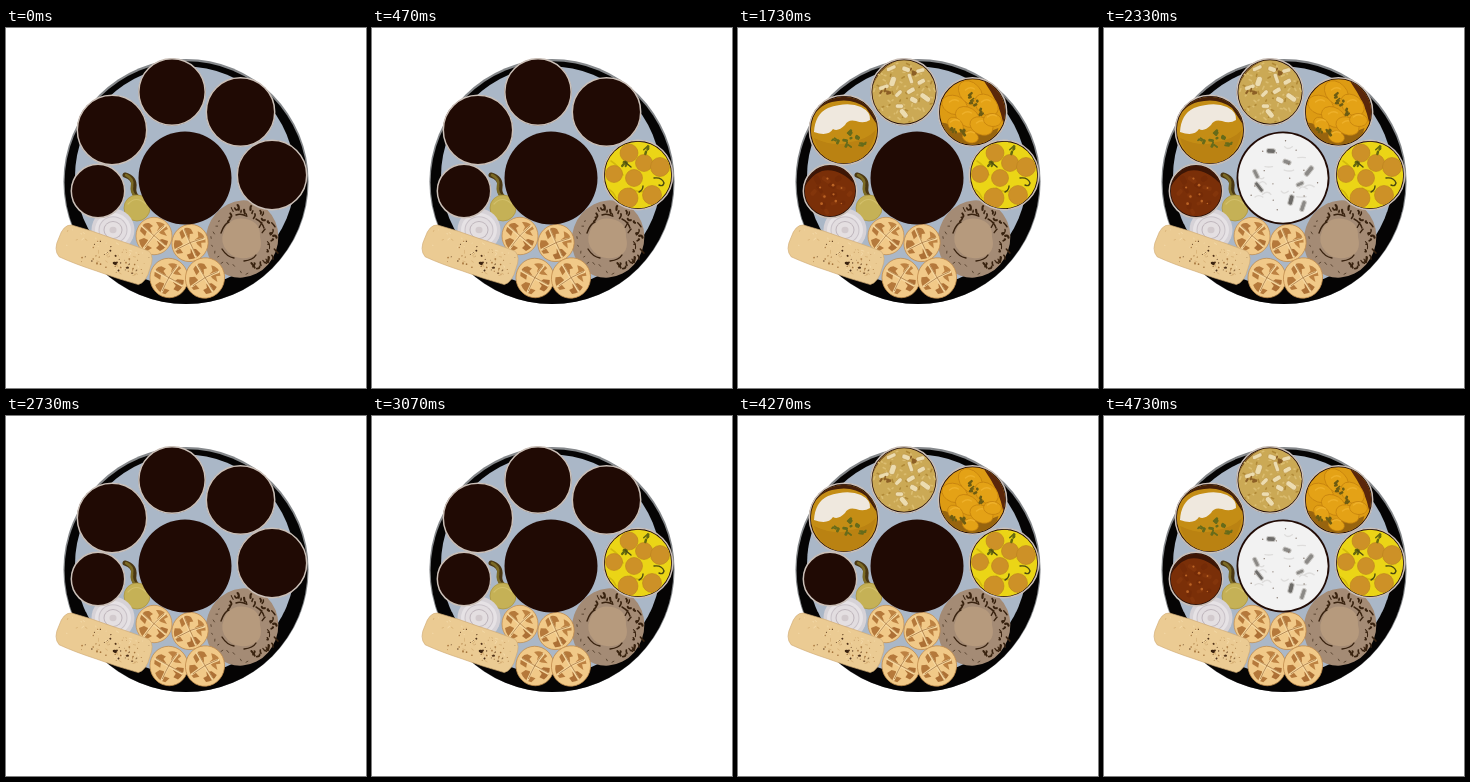
An HTML page that plays this animation: 360x360 px, repeating every 5.34 s.

```html
<!DOCTYPE html>
<html lang="en">
<head>
<meta charset="utf-8">
<title>Thali</title>
<style>
html, body { margin: 0; width: 100%; height: 100%; overflow: hidden; background: #fff; }
svg { display: block; width: 100vw; height: 100vh; }
</style>
</head>
<body>
<svg id="stage" viewBox="0 0 360 360"></svg>
<script>
const NS = 'http://www.w3.org/2000/svg';
const stage = document.getElementById('stage');
const LOOP = 5340, RESET = 2730;
const DARK = '#200a04';

let seed = 7;
const rnd = (a = 0, b = 1) => {
  seed = (seed * 16807) % 2147483647;
  return a + (b - a) * seed / 2147483647;
};

function add(parent, tag, attrs) {
  const el = document.createElementNS(NS, tag);
  for (const k in attrs) el.setAttribute(k, attrs[k]);
  parent.appendChild(el);
  return el;
}
const circle = (g, cx, cy, r, fill, more) => add(g, 'circle', { cx, cy, r, fill, ...more });
const path = (g, d, fill, more) => add(g, 'path', { d, fill, ...more });
const line = (g, d, stroke, width) =>
  path(g, d, 'none', { stroke, 'stroke-width': width, 'stroke-linecap': 'round', 'stroke-linejoin': 'round' });
const group = (g, x, y, turn = 0) => add(g, 'g', { transform: `translate(${x} ${y}) rotate(${turn})` });

// Calls fn at n scattered points, evenly spread over a disc
function scatter(n, radius, fn) {
  for (let i = 0; i < n; i++) {
    const d = radius * Math.sqrt((i + 0.5) / n), a = i * 2.4 + rnd(0, 0.5);
    fn(d * Math.cos(a), d * Math.sin(a), i);
  }
}
function chunk(g, x, y, w, h, fill, more) {
  add(g, 'rect', { x: x - w / 2, y: y - h / 2, width: w, height: h, rx: h / 2.3, fill,
    transform: `rotate(${rnd(-80, 80)} ${x} ${y})`, ...more });
}
function leaves(g, spots, color = '#5d6418') {
  for (const [x, y] of spots)
    for (let i = 0; i < 4; i++)
      chunk(g, x + rnd(-4, 4), y + rnd(-3, 3), rnd(3, 6), rnd(1.5, 3), color);
}

// Plate with a thin metal edge along the top
circle(stage, 180, 153.5, 122.6, '#85888b');
circle(stage, 180, 154.6, 121.4, '#050404');
circle(stage, 179, 148.5, 110, '#aab7c7');

// Flatbread on the right
function flatbread() {
  const g = group(stage, 236, 211);
  add(g, 'ellipse', { rx: 36, ry: 39, fill: '#a48b75', transform: 'rotate(20)' });
  path(g, 'M-18-8Q-12-23 4-20Q19-17 18-2Q22 13 9 18Q-5 22-14 13Q-23 4-18-8Z', '#b69a7d');
  for (let i = 0; i < 34; i++) {
    const a = -2.1 + i * 0.1, d = rnd(25, 35);
    const x = d * Math.cos(a), y = d * Math.sin(a);
    line(g, `M${x} ${y}q${rnd(-1, 3)} ${rnd(-1, 3)} ${rnd(-3, 4)} ${rnd(1, 5)}`, '#38220f', rnd(1, 2.3));
  }
  for (let i = 0; i < 12; i++) {
    const a = 1.4 + i * 0.22, d = rnd(28, 35);
    line(g, `M${d * Math.cos(a)} ${d * Math.sin(a)}l${rnd(-2, 2)} ${rnd(-2, 2)}`, '#4a3522', 0.8);
  }
  line(g, 'M-21-6q3-9 8-11M-20 10q5 8 12 9M2 22q9-1 12-6M14-20q6 3 8 9M-6-24q5-2 10 1', '#38220f', 1.4);
}

// Small puffed breads
function puri(x, y, r, turn) {
  const g = group(stage, x, y, turn);
  add(g, 'ellipse', { rx: r, ry: r * 1.04, fill: '#f1c988', stroke: '#c08a4a', 'stroke-width': 0.7 });
  path(g, 'M-14-5Q-12-14-5-13L-1-10L-4-8L-2-3L-7-5L-9 0Z', '#b5793b');
  path(g, 'M2-14Q10-15 14-7L10-5L13 0L7-2L3-5L5-9Z', '#bd8242');
  path(g, 'M-15 4L-10 2L-6 4L-7 9L-2 12L-7 15Q-14 12-15 4Z', '#b5793b');
  path(g, 'M3 5L8 3L14 5Q13 12 6 15L2 12L5 9Z', '#ad7035');
  line(g, 'M-12-10Q-3-2 11 10M11-10Q0-2-10 12', '#f6d79e', 2.2);
  line(g, 'M-11-10Q-2-2 11 9M10-10Q0-2-9 11', '#9a6732', 0.6);
}

// Long rolled bread
function roll() {
  const g = group(stage, 98, 226.5, 18);
  path(g, 'M-40-18Q-20-19 2-18Q28-18 42-17Q49-13 48-1Q49 13 42 18Q20 19-2 18Q-25 18-42 16Q-50 11-48-2Q-48-16-40-18Z',
    '#ebcb93', { stroke: '#d0ab74', 'stroke-width': 0.6 });
  for (let i = 0; i < 45; i++)
    chunk(g, rnd(-42, 40), rnd(-15, 14), rnd(1, 4), 0.8, i % 2 ? '#d8b277' : '#f3d9a8');
  for (let i = 0; i < 50; i++)
    circle(g, rnd(-20, 44), rnd(-12, 14), rnd(0.3, 0.9), i % 3 ? '#a5743c' : '#5c3a1c');
  for (let i = 0; i < 6; i++) circle(g, rnd(-18, 34), rnd(-6, 11), 1, '#4d2f18');
  add(g, 'ellipse', { cx: 13, cy: 5, rx: 2.2, ry: 1.5, fill: '#38210f' });
}

// Chilli, lemon, onion
line(stage, 'M119 147Q129 150 128 159Q127 165 131 169', '#4a3713', 5);
line(stage, 'M120 147Q128 151 126 158Q125 164 129 168', '#7b6a25', 2.6);
circle(stage, 131, 180, 13, '#c5b156', { stroke: '#ad9640', 'stroke-width': 0.8 });
line(stage, 'M122 176Q130 167 140 176', '#d3c06c', 1.2);
circle(stage, 107, 202, 21.5, '#d6d2d7');
[[18, '#e6e2e5'], [14.5, '#c9c2c8'], [13.5, '#e2dde0'], [9.5, '#beb5bb'], [8.5, '#e4dfe1'], [3.5, '#d2cacd']]
  .forEach(([r, c]) => add(stage, 'ellipse', { cx: 107, cy: 202, rx: r, ry: r * 0.94, fill: c }));

flatbread();
puri(148, 208, 18, 0);
puri(184, 215, 18, 25);
roll();
puri(163, 250, 19, -12);
puri(199, 250, 19.5, 18);

// Bowl fillings, each drawn around its own centre
function rice(g) {
  circle(g, 0, 0, 40, '#cba955');
  path(g, 'M-36 10Q-31-20-8-31L-36-36Z', '#7b5521');
  scatter(70, 31, (x, y, i) => chunk(g, x, y, rnd(2, 5), 1.6, i % 3 ? '#dbbd70' : '#b08936'));
  scatter(13, 26, (x, y) => chunk(g, x + 2, y - 3, rnd(8, 12), rnd(4, 6), '#ecdcb0', { stroke: '#b78f42', 'stroke-width': 0.5 }));
  leaves(g, [[-19, 0], [8, -20]], '#8c5f25');
}
function curry(g) {
  circle(g, 0, 0, 40, '#dd9b13');
  path(g, 'M8-36Q18-22 25-8Q29 2 31 12L40 0L30-30Z', '#5a270a');
  path(g, 'M-34 10Q-20 12-10 19Q8 24 26 16L20 36H-24Z', '#97640f');
  const bits = [[-18, -7, 13], [-2, -19, 14], [14, -7, 13], [-5, 5, 13], [-17, 13, 9], [9, 14, 12], [20, 8, 9], [-2, 25, 8]];
  for (const [x, y, r] of bits) {
    add(g, 'ellipse', { cx: x, cy: y, rx: r, ry: r * 0.72, fill: '#e4a216', stroke: '#c27f0d', 'stroke-width': 0.7,
      transform: `rotate(${rnd(-50, 50)} ${x} ${y})` });
    line(g, `M${x - 5} ${y - 3}q4-4 9-1`, '#eeb02a', 1.4);
  }
  leaves(g, [[2, -8], [7, 0], [-3, -15], [-18, 18], [-12, 21]], '#6d5c12');
}
function dumplings(g) {
  circle(g, 0, 0, 40, '#ebd516');
  line(g, 'M-27-14q8 5 12 14M-8 13q8 6 20 2M-30 14q5 2 8 9', '#d3b90d', 1.6);
  for (const [x, y, r] of [[-9, -22, 9], [6, -12, 8.5], [22, -8, 9.5], [-24, -1, 8.5], [-4, 3, 8.5], [14, 20, 9.5], [-10, 23, 10]])
    circle(g, x, y, r, '#cd9127', { stroke: '#bb8220', 'stroke-width': 0.6 });
  leaves(g, [[-15, -11], [8, -25]], '#66690f');
  line(g, 'M16 3q8-1 10 5q-1 4-5 2M1 17q4-2 4-6M-13-13l6 5', '#4c4a10', 1.4);
}
function kadhi(g) {
  circle(g, 0, 0, 40, '#c48d15');
  path(g, 'M-38 2Q-30-24-12-28Q8-33 22-22L34-4L38-38H-38Z', '#45200a');
  path(g, 'M-30 8Q-8 18 6 12Q22 10 32 0Q25 34 0 35Q-25 30-30 8Z', '#ba8212');
  path(g, 'M-30 2Q-29-16-16-22Q4-29 17-23Q27-18 26-10Q20-6 12-9Q4-11 1-5Q-6 2-11-1Q-16 7-30 2Z', '#efe8de');
  leaves(g, [[4, 3], [11, 8], [-8, 10], [2, 13], [17, 14]], '#666b1a');
}
function gravy(g) {
  circle(g, 0, 0, 30, '#7a2f08');
  path(g, 'M-30 8Q-24-14-8-20Q10-24 27-4L30-30H-30Z', '#3d1606');
  scatter(14, 20, (x, y, i) => chunk(g, x, y + 3, rnd(5, 10), rnd(3, 6), i % 2 ? '#83350b' : '#742b07'));
  scatter(9, 16, (x, y) => circle(g, x, y + 2, rnd(0.6, 1.4), '#bb6425'));
}
function raita(g) {
  circle(g, 0, 0, 50, '#f2f2f2');
  for (let i = 0; i < 12; i++)
    line(g, `M${rnd(-34, 26)} ${rnd(-32, 32)}q${rnd(2, 6)} ${rnd(-5, 5)} ${rnd(5, 10)} 0`, '#dedddc', 1.4);
  const bits = [[-12, -27], [4, -16], [-27, -4], [-24, 9], [26, -7], [17, 6], [8, 22], [20, 28]];
  bits.forEach(([x, y], i) => {
    chunk(g, x, y, rnd(7, 12), rnd(3.5, 5), i % 3 ? '#8b8986' : '#6d6b68', { stroke: '#c9c7c4', 'stroke-width': 1 });
  });
  scatter(16, 38, (x, y) => circle(g, x, y, 0.7, '#82746a'));
}

// x, y, radius, filling, time filled in the first and second round
const bowls = [
  [166, 64, 33.5, rice, 1000, 3730],
  [234.5, 84, 34.5, curry, 670, 3400],
  [266, 147, 35, dumplings, 330, 3070],
  [106, 102, 35, kadhi, 1330, 4070],
  [92, 163, 27, gravy, 1670, 4400],
  [179, 150, 46.5, raita, 2000, 4730]
].map(([x, y, r, fill, first, second], i) => {
  const g = group(stage, x, y);
  circle(g, 0, 0, r, DARK);
  const clip = add(g, 'clipPath', { id: 'bowl' + i });
  circle(clip, 0, 0, r - 1.8, '#000');
  const food = add(g, 'g', { 'clip-path': `url(#bowl${i})` });
  fill(food);
  if (fill !== raita) circle(g, 0, 0, r - 0.3, 'none', { stroke: '#cbc0b8', 'stroke-width': 1.5 });
  return { food, first, second };
});

function draw() {
  const t = performance.now() % LOOP;
  for (const { food, first, second } of bowls) {
    const full = t < RESET ? t >= first : t >= second;
    food.style.display = full ? '' : 'none';
  }
  requestAnimationFrame(draw);
}
draw();
</script>
</body>
</html>
```
